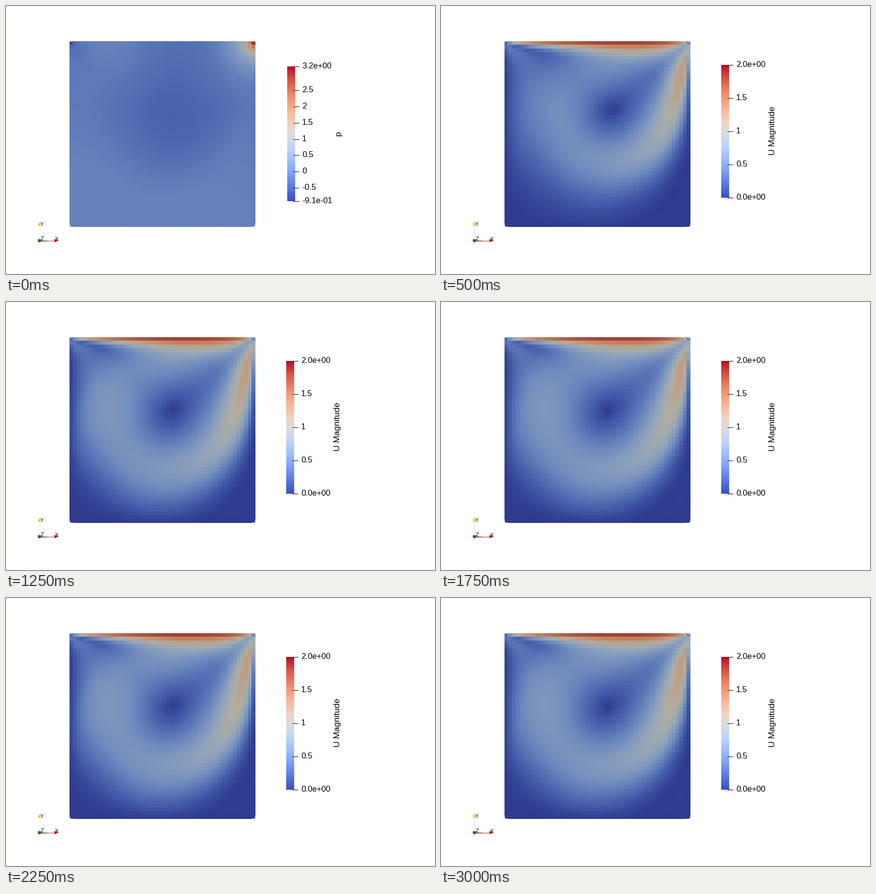
These frames come from a looping animation (865x541 px, 3.75 s). A matplotlib script:

```python
import numpy as np
import matplotlib.pyplot as plt
from matplotlib.animation import FuncAnimation
from matplotlib.patches import Circle, Polygon

W, H, DPI = 865, 541, 100
FRAMES, INTERVAL = 15, 250
LEFT, TOP, SIDE = 128, 71, 375
SHADE = np.array([0.785, 0.785, 0.745])
FONT = "Liberation Sans"
cmap = plt.get_cmap("coolwarm")

# Lid-driven cavity at Re 400 on a staggered grid, lid speed and side scaled to 1
N, NU, DT = 50, 1 / 400, 0.008
CELL = 1 / N
LID = 2.0
SAVE_EVERY = 10.0
SAVES = 7

k = np.arange(N)
basis = np.cos(np.pi * np.outer(k + 0.5, k) / N) * np.sqrt(2 / N)
basis[:, 0] /= np.sqrt(2)
eig = (2 * np.cos(np.pi * k / N) - 2) / CELL**2
lam = eig[:, None] + eig[None, :]
lam[0, 0] = 1


def poisson(rhs):
    coef = basis.T @ rhs @ basis / lam
    coef[0, 0] = 0
    return basis @ coef @ basis.T


def forces(u, v):
    ug = np.vstack([-u[:1], u, 2 - u[-1:]])
    vg = np.hstack([-v[:, :1], v, -v[:, -1:]])
    uv = (ug[1:] + ug[:-1]) * (vg[:, 1:] + vg[:, :-1]) / 4
    uu = ((u[:, 1:] + u[:, :-1]) / 2) ** 2
    vv = ((v[1:] + v[:-1]) / 2) ** 2
    lap_u = (u[:, 2:] + u[:, :-2] + (ug[2:] + ug[:-2])[:, 1:-1]
             - 4 * u[:, 1:-1])
    lap_v = (v[2:] + v[:-2] + (vg[:, 2:] + vg[:, :-2])[1:-1]
             - 4 * v[1:-1])
    fu = NU * lap_u / CELL**2 - (np.diff(uu, axis=1)
                                 + np.diff(uv, axis=0)[:, 1:-1]) / CELL
    fv = NU * lap_v / CELL**2 - (np.diff(vv, axis=0)
                                 + np.diff(uv, axis=1)[1:-1]) / CELL
    return fu, fv


def speed(u, v):
    return LID * np.hypot(u[:, 1:] + u[:, :-1], v[1:] + v[:-1]) / 2


def simulate():
    u, v = np.zeros((N, N + 1)), np.zeros((N + 1, N))
    saved = [speed(u, v)]
    old = forces(u, v)
    for _ in range(SAVES):
        for _ in range(round(SAVE_EVERY / DT)):
            new = forces(u, v)
            u[:, 1:-1] += DT * (1.5 * new[0] - 0.5 * old[0])
            v[1:-1] += DT * (1.5 * new[1] - 0.5 * old[1])
            old = new
            div = (np.diff(u, axis=1) + np.diff(v, axis=0)) / CELL
            p = poisson(div / DT)
            u[:, 1:-1] -= DT * np.diff(p, axis=1) / CELL
            v[1:-1] -= DT * np.diff(p, axis=0) / CELL
        saved.append(speed(u, v))
    return saved, LID**2 * (p - p[0, 0])


def paint(field, low, high):
    rgb = cmap(np.clip((field - low) / (high - low), 0, 1))[::-1, :, :3]
    return rgb * SHADE


speeds, pressure = simulate()
speed_pics = [paint(s, 0, 2) for s in speeds]
pressure_pic = paint(pressure, -0.91, 3.2)

fig = plt.figure(figsize=(W / DPI, H / DPI), dpi=DPI, facecolor="white")
ax = fig.add_axes([0, 0, 1, 1])
ax.axis("off")


def px(size):
    return size * 72 / DPI


def label(x, y, text, size=16.3, **kw):
    return ax.text(x, y, text, fontsize=px(size), family=FONT,
                   color="black", **kw)


def line(xs, ys, color, width=1.0):
    return ax.plot(xs, ys, color=color, lw=px(width),
                   solid_capstyle="butt")[0]


def color_bar(x, top, bottom, ticks, title, title_x, title_y, title_size):
    ramp = np.linspace(1, 0, 256)[:, None]
    parts = [ax.imshow(ramp, cmap=cmap, extent=(x, x + 16, bottom, top),
                       aspect="auto", interpolation="nearest")]
    for y, text in ticks:
        parts.append(line([x + 12, x + 24], [y + 0.5] * 2, "black"))
        parts.append(label(x + 30, y + 5, text))
    parts.append(label(title_x, title_y, title, title_size, rotation=90,
                       ha="right", va="center"))
    return parts


plate = ax.imshow(pressure_pic, extent=(LEFT, LEFT + SIDE, TOP + SIDE, TOP),
                  aspect="auto", interpolation="nearest")
r, b = LEFT + SIDE, TOP + SIDE
outline = Polygon([(LEFT, TOP + 1), (LEFT + 9, TOP), (r - 9, TOP),
                   (r, TOP + 1), (r, b - 9), (r - 1, b - 1), (r - 10, b),
                   (LEFT + 10, b), (LEFT + 1, b - 1), (LEFT, b - 9)],
                  transform=ax.transData)

p_ticks = [(121, "3.2e+00"), (169, "2.5"), (202, "2"), (235, "1.5"),
           (268, "1"), (300, "0.5"), (333, "0"), (366, "-0.5"),
           (393, "-9.1e-01")]
u_ticks = [(118, "2.0e+00"), (185, "1.5"), (252, "1"), (319, "0.5"),
           (386, "0.0e+00")]
p_bar = color_bar(567, 122, 394, p_ticks, "p", 678, 257, 17.4)
u_bar = color_bar(565, 119, 387, u_ticks, "U Magnitude", 676, 252, 17.4)

# Orientation axes
line([67.5, 67.5], [442, 473], "#dcdcdc")
line([67.5, 84], [473.5, 473.5], "#70302c", 1.4)
line([84, 98], [473.5, 473.5], "#d05a50", 1.4)
ax.add_patch(Polygon([(64, 443.5), (71, 443.5), (67.5, 435.5)],
                     fc="#d8d414", ec="none"))
ax.add_patch(Polygon([(97.5, 470), (97.5, 477), (106, 473.5)],
                     fc="#dc1414", ec="none"))
ax.add_patch(Circle((67.5, 473.5), 3.4, fc="#0a640a", ec="none"))
label(69, 444, "Y", 10.5)
label(99, 474, "X", 10.5)
label(70, 473, "Z", 10.5)

ax.set_xlim(0, W)
ax.set_ylim(H, 0)
ax.set_aspect("auto")
plate.set_clip_path(outline)


def update(i):
    show_p = i == 0
    for part in p_bar:
        part.set_visible(show_p)
    for part in u_bar:
        part.set_visible(not show_p)
    if show_p:
        plate.set_data(pressure_pic)
    else:
        plate.set_data(speed_pics[min(i - 1, SAVES)])
    return [plate, *p_bar, *u_bar]


anim = FuncAnimation(fig, update, frames=FRAMES, interval=INTERVAL,
                     repeat=True, repeat_delay=0)
plt.show()
```
